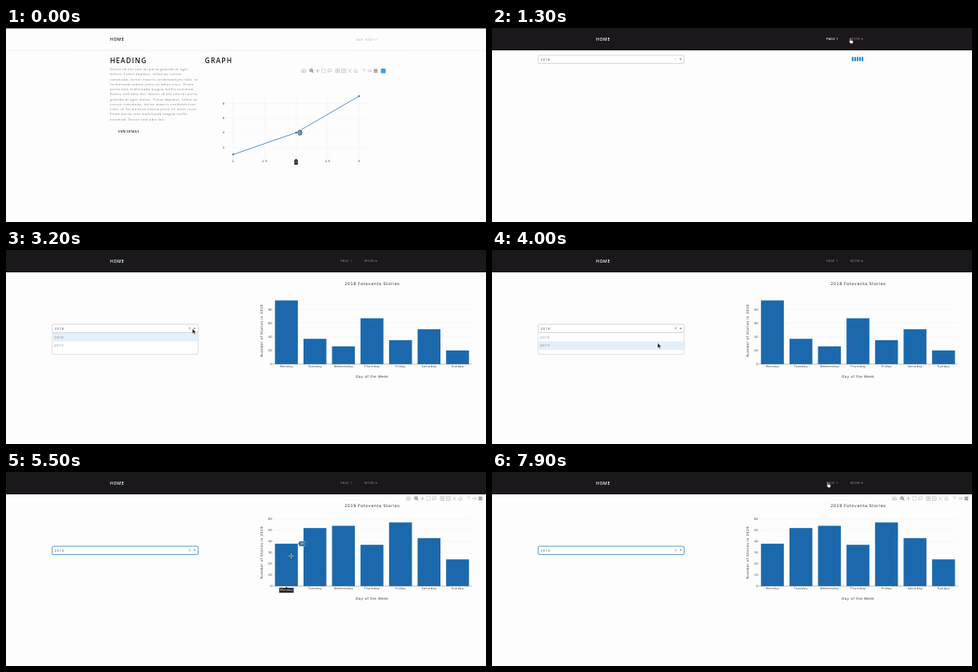
These frames come from a looping animation (600x243 px, 8000 ms). An HTML page:

```html
<!DOCTYPE html>
<html lang="en">
<head>
<meta charset="utf-8">
<title>Dashboard tour</title>
<style>
  html, body { margin: 0; width: 100%; height: 100%; overflow: hidden; background: #fefdfe; }
  svg { display: block; width: 100vw; height: 100vh; }
  text { font-family: "Open Sans", sans-serif; white-space: pre; }
  .plot { font-family: "DejaVu Sans", sans-serif; }
</style>
</head>
<body>
<svg id="stage" viewBox="0 0 600 243" xmlns="http://www.w3.org/2000/svg"></svg>
<script>
const LOOP = 8000, STEP = 100;
const BLUE = '#1b69ac', INK = '#1a181b';
const stage = document.getElementById('stage');

const clamp = v => Math.max(0, Math.min(1, v));

// Text is placed by its vertical middle.
function text(x, y, str, size, o = {}) {
  const { fill = '#333', weight = 400, gap = 0, anchor = 'start', cls = '', turn = 0 } = o;
  const shift = anchor === 'middle' ? gap / 2 : anchor === 'end' ? gap : 0;
  const spin = turn ? ` transform="rotate(${turn} ${x} ${y})"` : '';
  return `<text class="${cls}" x="${x + shift}" y="${y + size * 0.36}" font-size="${size}" fill="${fill}"` +
    ` font-weight="${weight}" letter-spacing="${gap}" text-anchor="${anchor}"${spin}>${str}</text>`;
}
const plotText = (x, y, str, size, o = {}) =>
  text(x, y, str, size, { cls: 'plot', anchor: 'middle', gap: size * 0.1, ...o });
const rect = (x, y, w, h, fill, more = '') =>
  `<rect x="${x}" y="${y}" width="${w}" height="${h}" fill="${fill}" ${more}/>`;
const path = (d, fill, stroke = 'none', width = 0, more = '') =>
  `<path d="${d}" fill="${fill}" stroke="${stroke}" stroke-width="${width}" ${more}/>`;
const line = (x1, y1, x2, y2, color, width = 0.5) =>
  path(`M${x1} ${y1}L${x2} ${y2}`, 'none', color, width);

// ---- Pointer ----
const route = [
  [0, 367, 131], [200, 378, 112], [500, 436, 38], [700, 447.5, 13], [1600, 447.5, 13],
  [1800, 414, 25], [2100, 311, 65], [2300, 266.5, 82.5], [2500, 243, 90],
  [2900, 233, 98.5], [3200, 233, 98.5], [3400, 222, 107], [3700, 207, 116.5],
  [4500, 207, 116.5], [4700, 228, 115], [5000, 300, 112], [5400, 350, 107],
  [5900, 382, 98], [6300, 412, 90], [6400, 412.5, 89.5], [7200, 418, 80],
  [7400, 420, 64], [7700, 421, 24], [7900, 419.5, 13], [LOOP, 419.5, 13]
];

function pointerAt(t) {
  const i = route.findIndex(k => k[0] > t);
  const [t0, x0, y0] = route[i - 1], [t1, x1, y1] = route[i];
  const p = (t - t0) / (t1 - t0);
  return { x: x0 + (x1 - x0) * p, y: y0 + (y1 - y0) * p };
}

const shapes = {
  arrow: path('M0 0V6.4L1.5 5.1L2.5 7.3L3.6 6.8L2.6 4.7L4.6 4.5Z', '#111', '#fff', 0.5),
  hand: path('M-.2 0Q.5-.6 1 .2V2.4L3 2.8Q4 3 3.9 4L3.4 6.4H.6L-1.3 4Q-1.4 3.2-.3 3.7Z', '#fff', '#222', 0.5),
  cross: path('M0-3.6V-.9M0 .9V3.6M-3.6 0H-.9M.9 0H3.6', 'none', '#333', 1.5) +
    path('M0-3.4V-.7M0 .7V3.4M-3.4 0H-.7M.7 0H3.4', 'none', '#eee', 0.8)
};
const pointer = (p, kind) => `<g transform="translate(${p.x} ${p.y})">${shapes[kind]}</g>`;

// ---- Plot toolbar ----
const SQUARE = 'M-2.3-2.3h4.6v4.6h-4.6z';
const icons = [
  [0, 'M-2.4-1.4h1.3l.5-.7h1.2l.5.7h1.3v3.3h-4.8zM-.8.2a.8.8 0 1 0 1.6 0a.8.8 0 1 0-1.6 0'],
  [10, 'M.9.9L2.5 2.5M-2.3-.5a1.8 1.8 0 1 0 3.6 0a1.8 1.8 0 1 0-3.6 0M-1.4-.5h1.8'],
  [17.5, 'M-2.5 0h5M0-2.5v5'],
  [25, SQUARE],
  [32.5, 'M-2.4-.5a2.4 1.8 0 1 0 4.8 0a2.4 1.8 0 1 0-4.8 0M-1.5 1l-.4 1.6'],
  [42.5, SQUARE + 'M-1.5 0h3M0-1.5v3'],
  [50, SQUARE + 'M-1.5 0h3'],
  [57.5, 'M-2.3-2.3L2.3 2.3M2.3-2.3L-2.3 2.3'],
  [65, 'M-2.5.2L0-2.2L2.5.2M-1.5 0v2.1h3V0'],
  [75, 'M-1.5-1.8h2.6v2.6'],
  [82.5, 'M-2.3 0l1-1h3.4v2h-3.4z'],
  [90, 'M-2.3-1.6h4.6M-2.3 0h4.6M-2.3 1.6h4.6']
];
function toolbar(x, y, opacity) {
  const marks = icons.map(([dx, d], i) => {
    const strong = i === 1 || i === 11;
    const dash = i === 3 ? 'stroke-dasharray="1 .6"' : '';
    return `<g transform="translate(${x + dx} ${y})">` +
      path(d, 'none', strong ? '#6f6f72' : '#bbb', strong ? 0.95 : 0.75, dash) + '</g>';
  });
  return `<g opacity="${opacity}">${marks.join('')}</g>`;
}

function valueTag(x, y, str) {
  const w = str.length * 2.6 + 2.2;
  return path(`M${x} ${y}l1.5-1.5v-1.6h${w}v6.2h${-w}v-1.6z`, BLUE, '#fff', 0.3) +
    plotText(x + 1.5 + w / 2, y, str, 3.6, { fill: '#fff', gap: 0.2 });
}
function axisTag(x, y, str) {
  const w = str.length * 2.75 + 1.6;
  return path(`M${x} ${y}l1.5 1.5h${w / 2 - 1.5}v6h${-w}v-6h${w / 2 - 1.5}z`, '#222') +
    plotText(x, y + 4.4, str, 3.6, { fill: '#fff' });
}

// ---- First page ----
const lorem = [
  'Donec id elit non mi porta gravida at eget',
  'metus. Fusce dapibus, tellus ac cursus',
  'commodo, tortor mauris condimentum nibh, ut',
  'fermentum massa justo sit amet risus. Etiam',
  'porta sem malesuada magna mollis euismod.',
  'Donec sed odio dui. Donec id elit non mi porta',
  'gravida at eget metus. Fusce dapibus, tellus ac',
  'cursus commodo, tortor mauris condimentum',
  'nibh, ut fermentum massa justo sit amet risus.',
  'Etiam porta sem malesuada magna mollis',
  'euismod. Donec sed odio dui.'
];

function lineChart(hover) {
  const px = v => 284 + (v - 1) * 78.6, py = v => 167.6 - v * 9.13;
  let out = '';
  for (const v of [2, 4, 6, 8]) {
    out += line(274, py(v), 452, py(v), '#efeff1') +
      plotText(273, py(v), v, 3.6, { anchor: 'end' });
  }
  for (const v of [1, 1.5, 2, 2.5, 3]) {
    out += line(px(v), 80, px(v), 163, '#efeff1') + plotText(px(v), 166.5, v, 3.6);
  }
  const points = [1, 2, 3].map(v => [px(v), py(v * v)]);
  out += path('M' + points.join('L'), 'none', '#2a76b4', 0.8);
  out += points.map(([x, y]) => `<circle cx="${x}" cy="${y}" r="1.1" fill="${BLUE}"/>`).join('');
  if (hover) out += valueTag(px(2) + 1, py(4), '4') + axisTag(px(2), 163.8, '2');
  return out;
}

function homePage(t) {
  const p = pointerAt(t);
  const inPlot = p.y > 80 && p.y < 163;
  const onLink = p.y < 20;
  return rect(0, 0, 600, 0.8, '#555') + line(0, 28.3, 600, 28.3, '#e6e6e8', 0.6) +
    text(130, 14.3, 'HOME', 5.2, { fill: INK, weight: 600, gap: 0.55 }) +
    text(438, 14.3, 'BAR GRAPH', 3.7, { fill: onLink ? '#666' : '#b3b3b5', gap: 0.7 }) +
    text(130, 41, 'HEADING', 8.6, { fill: INK, weight: 600, gap: 1.05 }) +
    text(248.5, 41, 'GRAPH', 8.6, { fill: INK, weight: 600, gap: 1.15 }) +
    lorem.map((s, i) => text(130, 51.6 + i * 6.25, s, 4.15, { fill: '#818387', gap: 0.43 })).join('') +
    text(140, 129.2, 'VIEW DETAILS', 3.7, { fill: INK, weight: 600, gap: 0.2 }) +
    lineChart(inPlot && p.x < 401) +
    `<g opacity="${1 - clamp((t - 400) / 300)}">` +
    toolbar(372, 53.6, 1) + rect(468.7, 50.8, 5.8, 5.8, '#3d9be0') + '</g>' +
    pointer(p, onLink ? 'hand' : inPlot ? 'cross' : 'arrow');
}

// ---- Second page ----
const days = ['Monday', 'Tuesday', 'Wednesday', 'Thursday', 'Friday', 'Saturday', 'Sunday'];
const stories = {
  2018: { counts: [93, 37, 26, 67, 35, 51, 20], tick: 20 },
  2019: { counts: [38, 52, 54, 37, 57, 43, 24], tick: 10 }
};
const BASE = 143, HEIGHT = 84, LEFT = 332.7, PITCH = 35.65;

function barChart(year, hover) {
  const { counts, tick } = stories[year];
  const top = Math.max(...counts) / 0.95;
  const py = v => BASE - v / top * HEIGHT;
  const dayX = i => LEFT + PITCH * (i + 0.5);
  let out = '';
  for (let v = 0; v <= top + 0.01; v += tick) {
    if (v) out += line(LEFT, py(v), LEFT + 7 * PITCH, py(v), '#eeeef0');
    out += plotText(332.5, py(v), v, 3.6, { anchor: 'end', gap: 0.25 });
  }
  counts.forEach((v, i) => {
    out += rect(dayX(i) - 14.3, py(v), 28.6, BASE - py(v), BLUE) + plotText(dayX(i), 146.2, days[i], 3.6);
  });
  out += line(LEFT, BASE, LEFT + 7 * PITCH, BASE, '#777', 0.5) +
    plotText(457.5, 42, `${year} Fotovanta Stories`, 5, { gap: 0.5 }) +
    plotText(457.5, 158.2, 'Day of the Week', 4.2, { gap: 0.42 }) +
    plotText(319.8, 101, `Number of Stories in ${year}`, 4.2, { gap: 0.42, turn: -90 });
  if (hover >= 0) {
    out += valueTag(dayX(hover) + 14.3, py(counts[hover]), String(counts[hover])) +
      axisTag(dayX(hover), 143.8, days[hover]);
  }
  return out;
}

function dropdown(year, y, o) {
  const digits = { gap: 0.55, fill: '#444' };
  let out = '';
  if (o.open) {
    out += rect(57.8, y + 5, 182.4, 27.6, '#fff', 'stroke="#c9c9cc" stroke-width=".6" rx="1"') +
      rect(58.1, y + 5.6 + (o.marked ? 10.8 : 0), 181.8, 10.8, '#e3effb') +
      text(60.3, y + 11, '2018', 4.2, { ...digits, fill: '#777' }) +
      text(60.3, y + 21.7, '2019', 4.2, { ...digits, fill: '#777' });
  }
  const edge = o.focus ? '#4b98d2' : '#c3c3c8';
  out += rect(57.8, y - 5, 182.4, 10.4, '#fff', `stroke="${edge}" stroke-width="${o.focus ? 1 : 0.7}" rx="1.2"`) +
    text(60.8, y + 0.2, year, 4.2, digits) +
    path(`M228.4 ${y - 1.2}l2.4 2.4m0-2.4l-2.4 2.4`, 'none', o.busy ? '#ccc' : '#777', 0.6) +
    path(o.open ? `M234.2 ${y + 0.8}h3.2l-1.6-1.7z` : `M234.2 ${y - 0.8}h3.2l-1.6 1.7z`, '#777');
  return out;
}

const loader = () =>
  [0, 1, 2, 3, 4].map(i => rect(449.8 + i * 3.05, 36.3, 2.1, 5.2, '#1c8ad6')).join('');

function yearPage(t) {
  const p = pointerAt(t);
  const year = t < 4200 ? 2018 : 2019;
  const busy = t < 1400 || (t >= 4200 && t < 4300);
  const open = t >= 3200 && t < 4200;
  const inPlot = t > 4500 && p.x > LEFT && p.y > BASE - HEIGHT && p.y < BASE;
  const hover = inPlot ? Math.floor((p.x - LEFT) / PITCH) : -1;
  const fresh = t < 3200;
  return rect(0, 0, 600, 28, INK) +
    text(130, 14.3, 'HOME', 5.2, { fill: '#fff', weight: 600, gap: 0.55 }) +
    text(418, 14.1, 'PAGE 1', 3.6, { fill: fresh ? '#fff' : '#98979a', weight: fresh ? 600 : 400, gap: 0.5 }) +
    text(448, 14.1, 'MORE', 3.7, { fill: '#98979a', gap: 0.6 }) +
    path('M461.4 13.3h2.6l-1.3 1.4z', '#98979a') +
    dropdown(year, busy ? 39 : 98, { open, busy, focus: !fresh && !open, marked: p.y > 114.4 }) +
    (busy ? loader() : barChart(year, hover)) +
    toolbar(503, 33.2, clamp((t - 5000) / 300)) +
    pointer(p, p.y < 19 ? 'hand' : inPlot ? 'cross' : 'arrow');
}

let shown = -1;
function draw() {
  const t = Math.floor(performance.now() % LOOP / STEP) * STEP;
  if (t !== shown) {
    shown = t;
    stage.innerHTML = t < 1300 ? homePage(t) : yearPage(t);
  }
  requestAnimationFrame(draw);
}
draw();
</script>
</body>
</html>
```
